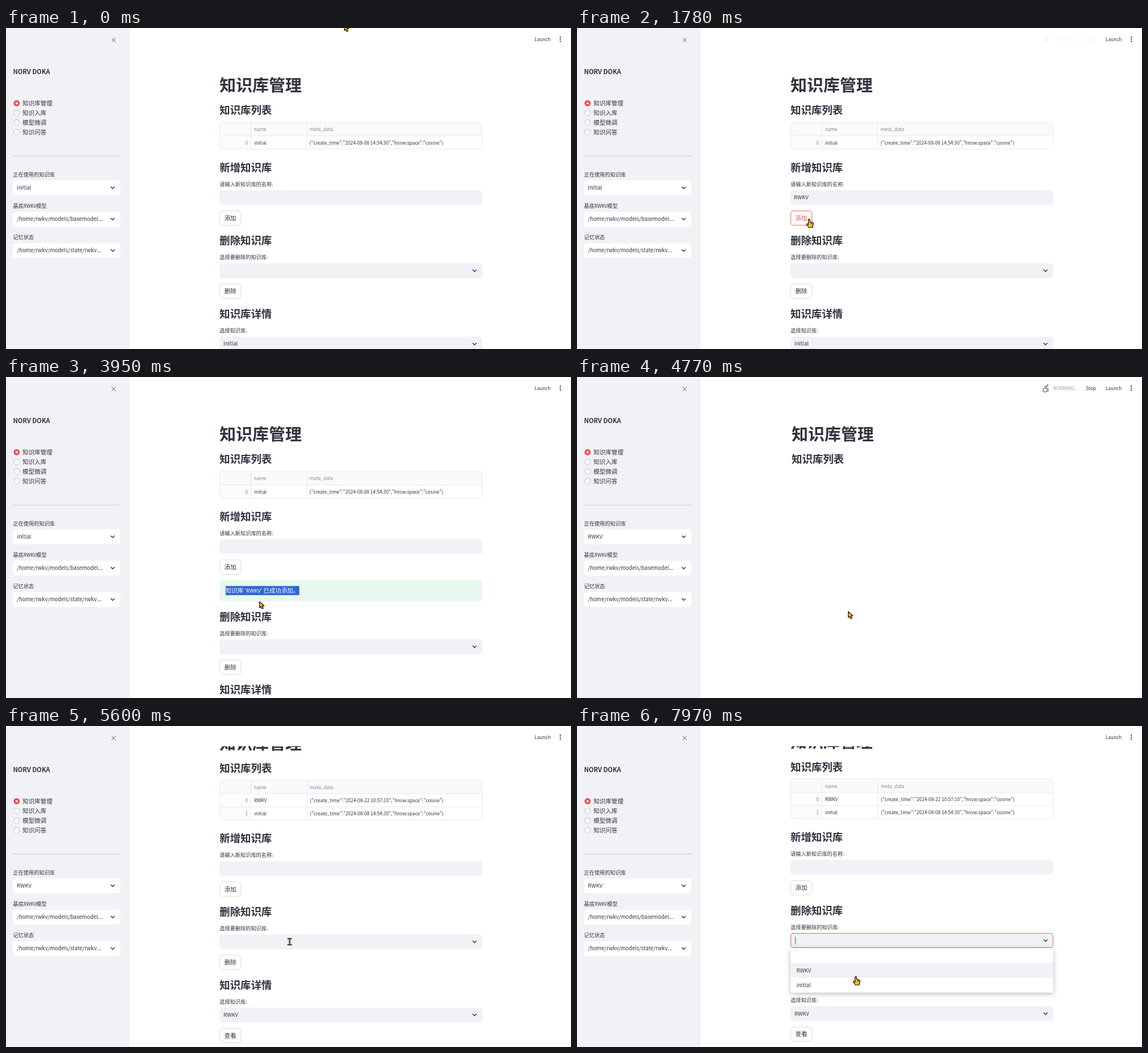
Write an HTML page with a canvas that moves like this. It is 993x564 px and loops after 8 s.

```html
<!DOCTYPE html>
<html lang="zh-CN">
<head>
<meta charset="utf-8">
<title>知识库管理</title>
<style>
html, body { margin: 0; width: 100%; height: 100%; overflow: hidden; background: #fff; }
canvas { display: block; width: 100%; height: 100%; }
</style>
</head>
<body>
<canvas id="stage"></canvas>
<script>
const W = 993, H = 564, LOOP = 8000;
const INK = '#31333f', GRAY = '#83869a', PANEL = '#f0f2f6', RED = '#f04a50', LINE = '#e6e7ea';
const FONT = '"Noto Sans CJK SC", "Noto Sans CJK", "Noto Sans", sans-serif';
const LATIN = 1 / 1.117; // Latin glyphs of the CJK face run large
const BODY = 10.5, SMALL = 9.2;
const LEFT = 375.3, RIGHT = 837, WIDE = RIGHT - LEFT;

const canvas = document.getElementById('stage');
const ctx = canvas.getContext('2d');
const dpr = window.devicePixelRatio || 1;
canvas.width = Math.round(W * dpr);
canvas.height = Math.round(H * dpr);

const clamp = (v, a = 0, b = 1) => Math.min(b, Math.max(a, v));
const between = (t, a, b) => t >= a && t < b;
const ramp = (t, a, b) => clamp((t - a) / (b - a));

// Pointer keys: time, x, y, shape from this key on (a arrow, i text, h hand)
const pointer = [
  [0, 594, -7, 'a'], [30, 594, -7, 'a'], [200, 565, 100, 'a'], [380, 510, 240, 'a'],
  [470, 488, 290, 'i'], [620, 484, 302, 'a'], [710, 455, 341, 'a'], [840, 455, 341, 'a'],
  [1350, 414, 334, 'h'], [1610, 408, 335.5, 'h'], [2150, 408, 335.5, 'h'], [2250, 415, 348, 'a'],
  [2470, 446, 395, 'a'], [2560, 450, 384, 'i'], [2680, 453, 375, 'i'], [2880, 453, 375, 'i'],
  [2980, 538, 375, 'i'], [3180, 356, 363, 'a'], [3350, 356, 363, 'a'], [3540, 381, 382, 'a'],
  [3740, 381, 382, 'a'], [3950, 445, 394, 'a'], [4290, 464, 395, 'a'], [4490, 464, 395, 'a'],
  [4770, 476.2, 411.5, 'a'], [5130, 488, 395, 'a'], [5320, 495, 386, 'a'], [5420, 497, 382, 'i'],
  [5600, 498.5, 379, 'i'], [6060, 505, 370, 'i'], [6290, 505, 370, 'a'], [6500, 568, 300, 'a'],
  [6600, 580, 250, 'i'], [6800, 582, 250, 'a'], [6920, 567, 310, 'a'], [7060, 572, 363, 'i'],
  [7120, 572, 363, 'i'], [7240, 558, 376, 'i'], [7330, 556, 378, 'i'], [7450, 545, 395, 'h'],
  [7910, 495, 431, 'h'], [7970, 490, 440, 'h'], [8000, 490, 440, 'h']
];

function pointerAt(t) {
  let i = 0;
  while (i < pointer.length - 2 && pointer[i + 1][0] <= t) i++;
  const a = pointer[i], b = pointer[i + 1], k = ramp(t, a[0], b[0]);
  return { x: a[1] + (b[1] - a[1]) * k, y: a[2] + (b[2] - a[2]) * k, kind: a[3] };
}

// Text centred vertically on y; Latin and CJK runs get matching sizes
function text(s, x, y, size = BODY, color = INK, weight = 400, align = 'left') {
  const runs = s.match(/…|[\x00-\x7f]+|[^\x00-\x7f…]+/g) || [];
  const hasCjk = /[^\x00-\x7f…]/.test(s);
  const setFont = run => {
    const px = run.charCodeAt(0) < 128 ? size * LATIN : size;
    ctx.font = `${weight} ${px}px ${run === '…' ? '"Noto Sans", sans-serif' : FONT}`;
  };
  const widths = runs.map(run => { setFont(run); return ctx.measureText(run).width; });
  const total = widths.reduce((a, b) => a + b, 0);
  if (align === 'right') x -= total;
  if (align === 'center') x -= total / 2;
  ctx.fillStyle = color;
  runs.forEach((run, i) => {
    setFont(run);
    ctx.fillText(run, x, y + size * (hasCjk ? 0.37 : 0.34));
    x += widths[i];
  });
}

function box(x, y, w, h, r, fill, stroke, lw = 0.9) {
  ctx.beginPath();
  ctx.roundRect(x, y, w, h, r);
  if (fill) { ctx.fillStyle = fill; ctx.fill(); }
  if (stroke) { ctx.strokeStyle = stroke; ctx.lineWidth = lw; ctx.stroke(); }
}

function poly(points, close) {
  ctx.beginPath();
  points.forEach(([x, y], i) => i ? ctx.lineTo(x, y) : ctx.moveTo(x, y));
  if (close) ctx.closePath();
}

function line(points, color, lw) {
  poly(points);
  ctx.strokeStyle = color;
  ctx.lineWidth = lw;
  ctx.stroke();
}

function disc(x, y, r, color) {
  ctx.beginPath();
  ctx.arc(x, y, r, 0, 7);
  ctx.fillStyle = color;
  ctx.fill();
}

function chevron(x, y) {
  ctx.lineCap = ctx.lineJoin = 'round';
  line([[x - 3, y - 1.5], [x, y + 1.5], [x + 3, y - 1.5]], INK, 1.4);
}

function button(label, y, hot, pressed) {
  box(LEFT + 0.4, y - 12.6, 37.2, 25.2, 5, pressed ? RED : '#fff', hot ? RED : '#d6d6d9');
  text(label, LEFT + 19, y, BODY, pressed ? '#fff' : hot ? RED : INK, 400, 'center');
}

function field(y, value, opt = {}) {
  box(LEFT, y - 13, WIDE, 26, 5, PANEL);
  if (opt.focus) box(LEFT + 0.4, y - 12.6, WIDE - 0.8, 25.2, 5, null, RED);
  text(value, LEFT + (opt.select ? 7 : 6), y - 0.3);
  if (opt.select) chevron(823.5, y);
  if (opt.caret) {
    ctx.font = `400 ${BODY * LATIN}px ${FONT}`;
    const cx = LEFT + (opt.select ? 8.5 : 6.5) + ctx.measureText(value).width;
    line([[cx, y - 6.5], [cx, y + 6.5]], INK, 0.8);
  }
}

function section(y, title, label, value, opt) {
  text(title, LEFT, y, 18.4, INK, 700);
  text(label, LEFT, y + 29.3, SMALL);
  field(y + 53, value, opt);
  button(opt.button, y + 89, opt.hot, opt.pressed);
}

function table(y, rows, shift) {
  const h = 23.6 + rows.length * 23.1;
  const c1 = 430.6, c2 = 528.6 + shift;
  ctx.save();
  ctx.beginPath();
  ctx.roundRect(LEFT, y, WIDE, h, 5);
  ctx.clip();
  ctx.fillStyle = '#f9fafb';
  ctx.fillRect(LEFT, y, WIDE, 23.6);
  ctx.fillStyle = '#fcfcfd';
  ctx.fillRect(LEFT, y + 23.6, c1 - LEFT, h);
  for (const c of [c1, c2]) line([[c, y], [c, y + h]], LINE, 0.9);
  rows.forEach((_, i) => {
    const ly = y + 23.7 + i * 23.1;
    line([[LEFT, ly], [RIGHT, ly]], LINE, 0.9);
  });
  ctx.restore();
  box(LEFT + 0.4, y, WIDE - 0.8, h, 5, null, LINE);
  text('name', 436, y + 12.4, SMALL, GRAY);
  text('meta_data', c2 + 5, y + 12.4, SMALL, GRAY);
  rows.forEach(([name, stamp], i) => {
    const ry = y + 35.8 + i * 23.1;
    text(String(i), 425, ry, SMALL, GRAY, 400, 'right');
    text(name, 436, ry, SMALL);
    text(`{"create_time":"${stamp}","hnsw:space":"cosine"}`, c2 + 5, ry, SMALL);
  });
}

function success(t) {
  const msg = "知识库 'RWKV' 已成功添加。", x = 385.8, y = 375.6;
  box(LEFT, 357, WIDE, 36.7, 5, '#e7f8ee');
  text(msg, x, y, BODY, '#177233');
  if (t < 2980) return;
  const from = clamp(pointerAt(t).x, x, 515.5);
  const start = t >= 3180 ? x : from;
  ctx.save();
  ctx.beginPath();
  ctx.rect(start, 367.3, 515.5 - start, 16);
  ctx.clip();
  ctx.fillStyle = '#2f66d0';
  ctx.fillRect(start, 367, 131, 17);
  text(msg, x, y, BODY, '#fff');
  ctx.restore();
}

function dropdown(t) {
  const top = 390, row = 26.2, h = row * 3;
  ctx.save();
  ctx.shadowColor = 'rgba(0,0,0,.28)';
  ctx.shadowBlur = 8 * dpr;
  ctx.shadowOffsetY = 2 * dpr;
  box(LEFT, top, WIDE, h, 4, '#fff');
  ctx.restore();
  const hover = clamp(Math.floor((pointerAt(t).y - top) / row), 0, 2);
  ctx.fillStyle = PANEL;
  ctx.fillRect(LEFT, top + hover * row, WIDE, row);
  ['', 'RWKV', 'initial'].forEach((s, i) => text(s, 385.8, top + (i + 0.5) * row));
}

function mainPage(t) {
  const blank = between(t, 4490, 5130), added = t >= 5130;
  const done = between(t, 2200, 4490);
  const scroll = 72.8 * (1 - Math.pow(1 - ramp(t, 5310, 5740), 3.05));
  const blink = Math.floor(t / 500) % 2 === 0;
  ctx.save();
  ctx.beginPath();
  ctx.rect(217, scroll > 0 ? 35.5 : 0, W, H);
  ctx.clip();
  ctx.translate(blank ? 2 : 0, -scroll);
  text('知识库管理', LEFT, 100.3, 28.9, INK, 700);
  text('知识库列表', LEFT, 144.5, 18.4, INK, 700);
  if (!blank) {
    const first = ['initial', '2024-08-08 14:54:30'];
    const rows = added ? [['RWKV', '2024-08-22 10:57:10'], first] : [first];
    table(165.8, rows, added ? 0.5 : 0);

    const y1 = added ? 268.1 : 245;
    const y2 = y1 + 128.6 + (done ? 47.3 : 0);
    const y3 = y2 + 128.6;
    const typed = between(t, 840, 2200) ? 'RWKV'.slice(0, Math.ceil((t - 839) / 90)) : '';
    const focus = between(t, 500, 1690) || between(t, 6600, 6910);
    section(y1, '新增知识库', '请输入新知识库的名称:', typed, {
      button: '添加', focus, caret: focus && blink,
      hot: between(t, 1350, 2250), pressed: between(t, 1690, 1750)
    });
    if (between(t, 840, 1690)) {
      text('Press Enter to apply', 832, 317, 7.9, 'rgba(49,51,63,.6)', 400, 'right');
    }
    if (done) success(t);
    const open = t >= 7260;
    section(y2, '删除知识库', '选择要删除的知识库:', '', {
      button: '删除', select: true, focus: open, caret: open && (blink || t > 7500)
    });
    section(y3, '知识库详情', '选择知识库:', added ? 'RWKV' : 'initial', {
      button: '查看', select: true
    });
  }
  ctx.restore();
  if (t >= 7290) dropdown(t);
}

function sidebar(t) {
  ctx.fillStyle = PANEL;
  ctx.fillRect(0, 0, 217, H);
  ctx.lineCap = 'round';
  line([[186, 18], [192.4, 24.4]], '#555762', 1);
  line([[192.4, 18], [186, 24.4]], '#555762', 1);
  text('NORV DOKA', 12.5, 76.5, 12.4, INK, 700);
  ['知识库管理', '知识入库', '模型微调', '知识问答'].forEach((s, i) => {
    const y = 132.2 + i * 16.9;
    if (i) {
      disc(18.7, y, 5.4, '#b4b6be');
      disc(18.7, y + 0.2, 4.7, '#f8f9fb');
    } else {
      disc(18.7, y, 5.4, RED);
      disc(18.7, y, 2, '#fff');
    }
    text(s, 29, y - 0.2);
  });
  line([[12.3, 225], [200.7, 225]], '#c6c8ce', 1);
  const picks = [
    ['正在使用的知识库', t < 4550 ? 'initial' : 'RWKV'],
    ['基底RWKV模型', '/home/rwkv/models/basemodel…'],
    ['记忆状态', '/home/rwkv/models/state/rwkv…']
  ];
  picks.forEach(([label, value], i) => {
    const y = 280.7 + i * 55.1;
    text(label, 12.3, y - 23.3, SMALL);
    box(12, y - 13, 189, 26, 5, '#fff');
    text(value, 19.3, y - 0.2);
    chevron(187.5, y);
  });
}

function figure(pose) {
  const c = '#6f717a', x = 824, y = 20;
  ctx.lineCap = ctx.lineJoin = 'round';
  const limb = (...pts) => line(pts.map(([px, py]) => [x + px, y + py]), c, 1.4);
  if (pose === 0) {
    disc(x, y - 5.2, 1.5, c);
    limb([-5, -2.3], [0, -1.8], [5, -2.3]);
    limb([-2, 6], [-1.3, -1], [1.3, -1], [2, 6]);
  } else if (pose === 1) {
    disc(x + 2, y - 5.3, 1.5, c);
    limb([-4, -0.5], [-1.5, -3], [1.5, -2.5], [4.5, 0]);
    limb([0.5, -2], [-0.5, 1.5], [2, 3], [1.5, 6.5]);
    limb([-0.5, 1.5], [-1.5, 4], [-5, 4]);
  } else {
    disc(x + 3, y - 5.4, 1.5, c);
    limb([-3, -2.5], [-0.5, -4], [2, -2.8], [-0.3, 0.2], [4, 1], [3.6, 5.5]);
    ctx.beginPath();
    ctx.arc(x - 1.5, y + 3, 3.4, 0.1, 5.2);
    ctx.stroke();
  }
}

function header(t) {
  const starts = t < 4000 ? [1765, 2300, 2470] : [4490, 5130, 5290];
  const alpha = ramp(t, starts[0], starts[0] + 200) * (1 - ramp(t, starts[1], starts[2]));
  if (alpha > 0) {
    ctx.globalAlpha = alpha;
    figure(Math.floor((t - starts[0]) / 140) % 3);
    text('RUNNING...', 837.3, 20, SMALL, 'rgba(49,51,63,.5)');
    text('Stop', 894.3, 20, SMALL);
    ctx.globalAlpha = 1;
  }
  text('Launch', 929, 20, SMALL);
  for (const y of [16.2, 19.8, 23.4]) disc(974.3, y, 1.15, INK);
}

function drawPointer({ x, y, kind }) {
  ctx.save();
  ctx.translate(x, y);
  ctx.lineJoin = 'round';
  ctx.fillStyle = '#f8bb1c';
  ctx.strokeStyle = '#17130a';
  ctx.lineWidth = 1.2;
  if (kind === 'a') {
    poly([[0.6, 0.6], [0.6, 11.4], [3.1, 9.2], [5, 13.3], [7.2, 12.3], [5.3, 8.4], [8.7, 8.2]], true);
  } else if (kind === 'i') {
    ctx.lineCap = 'butt';
    for (const side of [-1, 1]) line([[-4, side * 5.4], [4, side * 5.4]], '#2b2618', 2);
    line([[0, -6], [0, 6]], '#2b2618', 2.6);
    line([[0, -5], [0, 5]], '#b8922a', 0.9);
    ctx.restore();
    return;
  } else {
    ctx.beginPath();
    ctx.moveTo(-1.4, 1.2);
    ctx.quadraticCurveTo(0, -0.8, 1.4, 1.2);
    ctx.lineTo(1.7, 5.2);
    ctx.lineTo(6, 6.4);
    ctx.quadraticCurveTo(7.6, 7, 7.3, 9);
    ctx.lineTo(5.9, 15);
    ctx.lineTo(-0.6, 15);
    ctx.lineTo(-4.4, 10.2);
    ctx.quadraticCurveTo(-4.8, 8, -2.6, 8.6);
    ctx.lineTo(-1.2, 9.8);
    ctx.closePath();
  }
  ctx.fill();
  ctx.stroke();
  if (kind === 'h') {
    line([[3.3, 6.2], [3.3, 8.6]], '#17130a', 0.7);
    line([[5.1, 6.7], [5.1, 8.8]], '#17130a', 0.7);
  }
  ctx.restore();
}

function draw() {
  const t = performance.now() % LOOP;
  ctx.setTransform(canvas.width / W, 0, 0, canvas.height / H, 0, 0);
  ctx.fillStyle = '#fff';
  ctx.fillRect(0, 0, W, H);
  mainPage(t);
  sidebar(t);
  header(t);
  drawPointer(pointerAt(t));
  requestAnimationFrame(draw);
}
draw();
</script>
</body>
</html>
```
